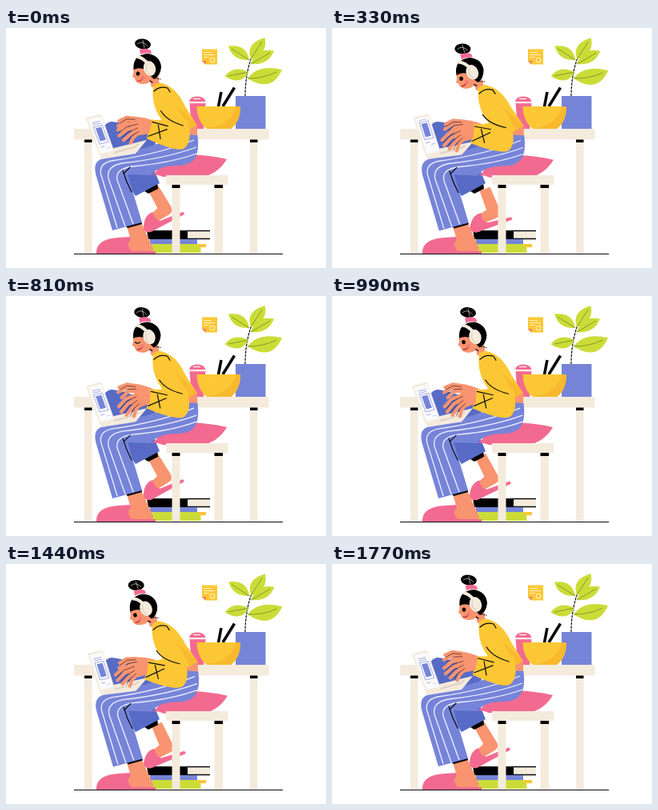
These frames come from a looping animation (400x300 px, 1800 ms). An HTML page:

```html
<!DOCTYPE html>
<html lang="en">
<head>
<meta charset="utf-8">
<title>Working at home</title>
<style>
html, body { margin: 0; width: 100%; height: 100%; overflow: hidden; background: #fff; }
svg { display: block; width: 100vw; height: 100vh; }
.cream { fill: #f4ebdd; }
.yellow { fill: #fcc734; }
.shade { fill: #f8b92e; }
.pink { fill: #f36a90; }
.blue { fill: #7684d8; }
.far { fill: #576bc6; }
.skin { fill: #f8946f; }
.leaf { fill: #cbdc38; }
.line { fill: none; stroke: #0b0b0f; stroke-width: 1.2; stroke-linecap: round; stroke-linejoin: round; }
.stripe { fill: none; stroke: #eef0ff; stroke-width: 1.3; }
.finger { fill: none; stroke: #f8946f; stroke-width: 4.2; stroke-linecap: round; stroke-linejoin: round; }
.crease { fill: none; stroke: #4d2430; stroke-width: .7; stroke-linecap: round; }
.vein { fill: none; stroke: #6f8f24; stroke-width: .8; }
</style>
</head>
<body>
<svg viewBox="0 0 400 300">
  <defs>
    <clipPath id="page"><rect x="2" y="4" width="14" height="36"/></clipPath>
  </defs>

  <!-- sticky note -->
  <path class="yellow" d="M245 26.500H264V45.500H249L245 41.500Z"/>
  <path d="M245 41L249.500 45.500L250 41Z" fill="#f3806a"/>
  <path d="M247 30.500H257M247 33.500H261M247 36.500H254" stroke="#fff3c8" stroke-width="1.1"/>
  <circle cx="258" cy="40" r="2.800" fill="none" stroke="#fff3c8" stroke-width="1.1"/>

  <!-- plant -->
  <g id="plant">
    <path class="line" stroke-dasharray="2.500 2" d="M299 85Q299 60 306 39"/>
    <path class="leaf" d="M306 39Q299 19 323.500 12Q328 32 306 39Z"/>
    <path class="leaf" d="M304 40Q283 41 278 22.500Q301 20 304 40Z"/>
    <path class="leaf" d="M306 45Q312 24 335 28.500Q328 47 306 45Z"/>
    <path class="leaf" d="M273.500 60.500Q284 46 303 55Q294 73 273.500 60.500Z"/>
    <path class="vein" d="M306 39L320 17M304 40L282 26M306 45L330 31M303 55L278 60"/>
  </g>
  <g id="bigLeaf">
    <path class="leaf" d="M302 63Q315 45 345 52Q332 82 302 63Z"/>
    <path class="vein" d="M302 63Q322 63 338 55"/>
  </g>
  <rect class="blue" x="287" y="85" width="37.500" height="41"/>

  <!-- cup and bowl -->
  <path class="pink" d="M229.500 94H249.500L247 126H232Z"/>
  <path class="pink" d="M229 92Q230 85.500 239 85.500Q248 85.500 249.500 92Z"/>
  <path d="M229.500 93.500H249.500M234 88.500H243" stroke="#fde2e6" stroke-width="1.3"/>
  <path d="M265.500 98L269 80M271 98L285.500 74.500" stroke="#0b0b0f" stroke-width="3.600"/>
  <path class="yellow" d="M238.500 98H293Q293 117 281 126H251Q239 117 238.500 98Z"/>
  <path class="shade" d="M252 126Q281 121 288 98H293Q293 117 281 126Z"/>

  <!-- table -->
  <path class="cream" d="M98 137H107.500V282H98ZM305 137H314.500V282H305Z"/>
  <path d="M98 139H107.500V143H98ZM305 139H314.500V143H305Z"/>
  <rect class="cream" x="85" y="126" width="243.500" height="13.500" rx="1.500"/>

  <!-- books -->
  <path d="M176 253H228V264H178Z"/>
  <path class="cream" d="M227 254H255V263H227Z"/>
  <path d="M226 253.500H255M226 263.500H255" stroke="#0b0b0f" stroke-width="1.300"/>
  <path class="blue" d="M180 264H239V270.500H180Z"/>
  <path class="yellow" d="M236 270H250V274H236Z"/>
  <path class="leaf" d="M183 270H240V274H243.500V281H183Z"/>

  <!-- far foot and far leg -->
  <g id="tap">
    <path class="pink" d="M172 250Q172 234 183 230L192 241L221 229L223 232L181 255Q173 256 172 250Z"/>
    <path class="skin" d="M177 203L189 196L206 223Q209 230 203 233L190 241Q184 238 183 231L189 225Z"/>
    <path class="pink" d="M172 250Q173 235 183 231Q186 240 193 241L185 253Q174 257 172 250Z"/>
  </g>
  <path d="M173 204L189 193L190 201L178 207Z"/>
  <path class="far" d="M143 170H182L192 194L162 210L143 182Z"/>
  <path class="far" d="M124 128Q121 119 132 117Q155 119 188 138L184 158L136 163Z"/>

  <!-- cushion and stool -->
  <g id="cushion">
    <path class="pink" d="M182 184Q194 176 192 164Q229 153 276 164Q264 184 243 186H196Q187 182 182 184Z"/>
  </g>
  <path class="cream" d="M207.500 194H217.500V282H207.500ZM260.500 194H271V282H260.500Z"/>
  <path d="M207.500 195H217.500V200H207.500ZM260.500 195H271V200H260.500Z"/>
  <rect class="cream" x="200" y="184" width="77.500" height="12" rx="1"/>

  <!-- near foot -->
  <path class="pink" d="M113 282Q112 264 140 262L156 261L160 279H187V282Z"/>
  <path class="skin" d="M151 248L169 243L181 269Q187 279 181 279H157Q149 270 156 265Z"/>

  <g id="hips">
    <path class="skin" d="M226 116L239 121L239 136H222Z"/>
    <path d="M149 247L169 241L170 245L152 250Z"/>
    <path class="blue" d="M226 133L239.500 134Q242 154 236 163Q230 172 214 172Q190 172 181 184L152 183L170 243L133 253L112.500 184Q107 164 126 162L177 149Q202 140 226 133Z"/>
    <path class="stripe" d="M235 140Q190 158 132 166Q115 170 119 184L139 250M238 149Q200 163 145 169Q125 173 128 188L149 248M238 157Q205 169 158 173Q136 176 139 190L159 245"/>
    <path class="line" d="M146 178Q150 192 157 205M147 182L155 174"/>
  </g>

  <!-- laptop -->
  <g id="laptop">
    <path class="cream" d="M117 158L135 150L176 140L162 157L119 164Z"/>
    <path d="M135 156L160 149L166 145" stroke="#ddd2c2" stroke-width="2" fill="none"/>
    <g transform="matrix(1 -.25 .36 1 101 113)">
      <rect class="cream" x="-1" y="-1" width="19" height="48" rx="1"/>
      <rect x="1" y="1.500" width="16" height="43" fill="#fbfafc"/>
      <g clip-path="url(#page)">
        <g id="scroll">
          <g id="article">
            <path d="M4 7H14M4 9.500H14M4 37H9M10 40H15" stroke="#a9b3e8" stroke-width="1"/>
            <rect x="4" y="12" width="11" height="21" fill="none" stroke="#a9b3e8"/>
            <rect class="blue" x="6" y="14" width="7" height="16"/>
          </g>
          <use href="#article" y="40"/>
        </g>
      </g>
    </g>
  </g>

  <!-- upper body -->
  <g id="torso">
    <g id="farHand">
      <path class="skin" d="M186 117Q174 110 160 107L153 113L166 124L184 128Z"/>
      <path class="finger" d="M163 110L152 107L142 110M162 112L151 111L140 116M164 116L153 116L144 123"/>
      <path class="crease" d="M162 111L152 109L142 113M163 114L152 113.500L144 119"/>
    </g>
    <g id="head">
      <path class="skin" d="M164 38Q158 49 159.500 56L158 61L161 63Q162 70 171 70Q177 70 180 67L182 74L192 72L189 48Z"/>
      <path d="M159.500 52Q158 33 178 32Q193 35 194 49Q193 60 185 64Q180 60 176 53Q168 48 159.500 52Z"/>
      <ellipse cx="171" cy="20" rx="10" ry="6.500" transform="rotate(8 171 20)"/>
      <path d="M164 20Q171 15 177 23M171 15L173 25" fill="none" stroke="#d9cfc7" stroke-width=".7"/>
      <path class="pink" d="M167 27Q175 24 181 28L182 32Q174 30 168 33Z"/>
      <path d="M164 36Q172 37 178 46" fill="none" stroke="#f4ebdd" stroke-width="4"/>
      <ellipse class="cream" cx="179.500" cy="50.500" rx="7.500" ry="9.500" transform="rotate(-18 179.500 50.500)"/>
      <path d="M176 46Q173 53 180 58" fill="none" stroke="#d8cbb9" stroke-width="1"/>
      <path class="line" stroke-dasharray="1 2" d="M184 62L193 64"/>
      <path class="line" d="M180 66L183 68"/>
      <g id="open"><ellipse cx="165" cy="57" rx="2.300" ry="2.600"/></g>
      <path id="closed" class="line" d="M162 57Q165 60 168 57"/>
      <circle cx="171" cy="62" r="2.500" fill="#f36a78" opacity=".6"/>
      <path d="M164 66Q168 67 170 64" fill="none" stroke="#b9243e" stroke-width="1.200"/>
    </g>
    <path class="yellow" d="M184 72Q190 66 198 70Q214 76 224 98L238.500 121L228 127L204 136L194 114Q181 96 184 72Z"/>
    <path class="shade" d="M212 96Q224 106 238.500 121L228 127Q222 110 212 96Z"/>
    <path class="line" d="M185 79Q192 72 202 75L205 80"/>
    <g id="forearm">
      <path class="yellow" d="M181 115Q199 118 210 110L227 116Q234 143 222 151Q212 155 176 139Z"/>
      <path class="line" d="M193 104Q200 116 221 122M182 118L202 123M178 136L201 127M190 122L193 139"/>
      <g id="nearHand">
        <path class="skin" d="M182 117Q167 115 158 121L155 130L166 136L179 133Z"/>
        <path class="finger" d="M163 120L150 123L140 131M163 124L151 130L142 138M165 129L155 136L148 143M167 132L160 139L157 146"/>
        <path class="crease" d="M164 122L151 126L142 134M164 127L153 133L146 140M166 131L158 137L153 144"/>
      </g>
    </g>
  </g>

  <path d="M85 282.500H346" stroke="#0b0b0f"/>
</svg>
<script>
const LOOP = 1800, STEP = 30;
const el = id => document.getElementById(id);
const move = (id, value) => el(id).setAttribute('transform', value);
const spin = (id, angle, x, y) => move(id, `rotate(${angle} ${x} ${y})`);

// 0..1..0 wave; starts at 0 when shift is 0
const wave = (t, period, shift = 0) => (1 - Math.cos(2 * Math.PI * (t + shift) / period)) / 2;
// eased 0..1 between two times
const ramp = (t, from, to) => wave(Math.min(Math.max(t - from, 0), to - from), 2 * (to - from));

function draw(t) {
  const nod = wave(t, 900), press = wave(t, 180);

  move('torso', `translate(${1.5 * nod} ${nod}) rotate(${-3 * nod} 235 130)`);
  move('head', `translate(${-nod} ${nod}) rotate(${-5 * nod} 186 68)`);
  move('forearm', `translate(${-5 * nod} ${nod}) rotate(${1 - 2 * press - 2 * nod} 222 140)`);
  spin('nearHand', 3 - 10 * press - 3 * nod, 179, 124);
  spin('farHand', -3 - 8 * wave(t, 180, 60) - 3 * nod, 182, 119);

  spin('laptop', 2.5 * nod, 119, 163);
  move('scroll', `translate(0 ${-40 * ramp(t, 200, 750)})`);
  move('hips', `translate(${nod} ${.6 * nod})`);
  move('cushion', `translate(${nod} ${.8 * nod})`);
  spin('tap', 9 * wave(t, 900, 90), 176, 252);
  spin('plant', .4 * nod, 299, 86);
  spin('bigLeaf', 2 * nod, 303, 65);

  const blink = t >= 750 && t < 870;
  el('open').style.display = blink ? 'none' : '';
  el('closed').style.display = blink ? '' : 'none';
}

const start = performance.now();
function tick() {
  const t = (performance.now() - start) % LOOP;
  draw(Math.floor(t / STEP) * STEP);
  requestAnimationFrame(tick);
}
tick();
</script>
</body>
</html>
```
